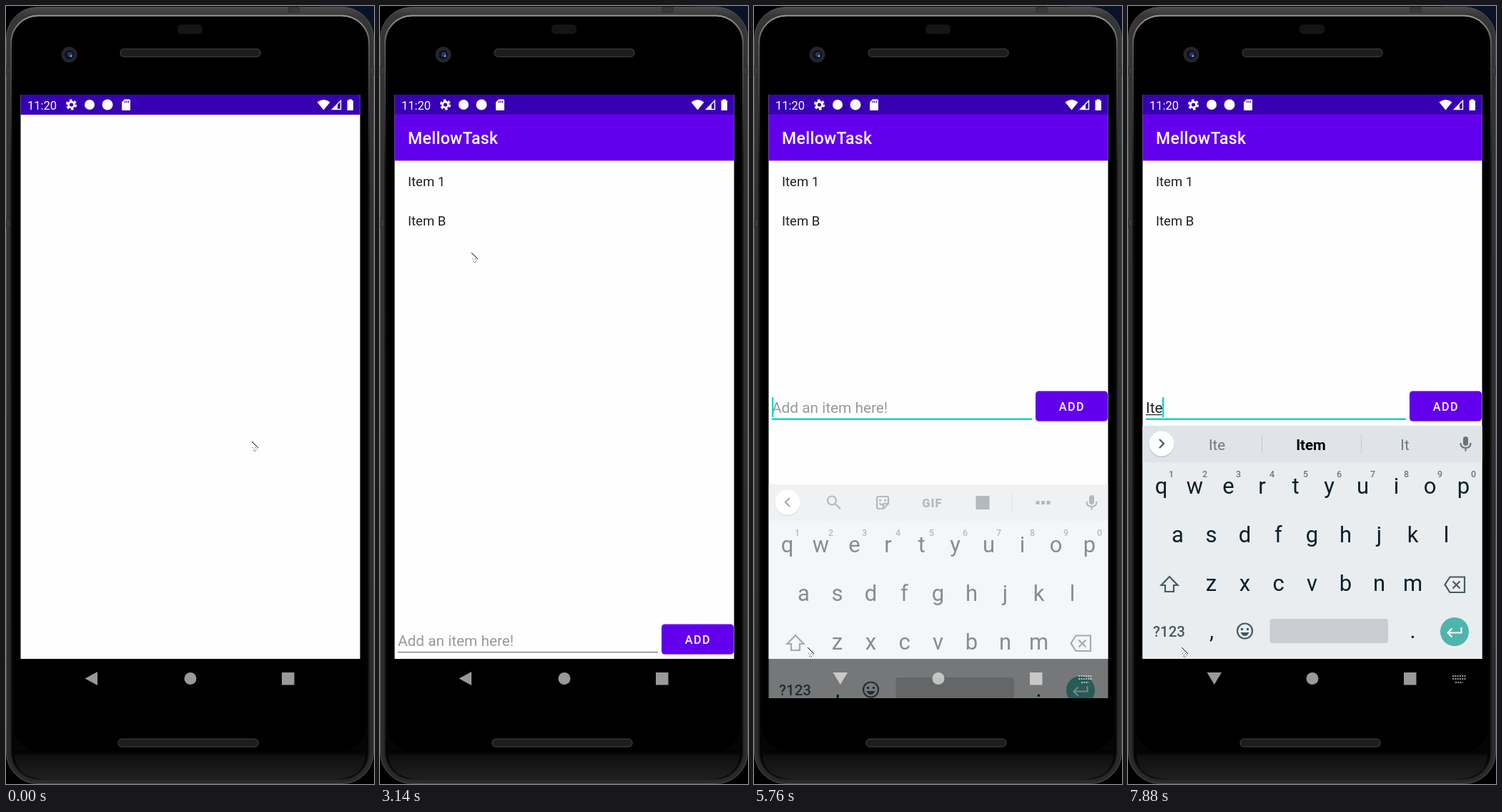
Animation, 515 px wide and 1088 px high, one loop 8 s. Source, as an HTML page:

```html
<!DOCTYPE html>
<html lang="en">
<head>
<meta charset="utf-8">
<title>To-do app on a phone</title>
<style>
  html, body { margin: 0; width: 100%; height: 100%; overflow: hidden; background: #000; }
  svg { display: block; width: 515px; height: 1088px; font-family: Roboto, sans-serif; }
  .mid { text-anchor: middle; }
  .line { fill: none; stroke-width: 2.2; }
  .tools { fill: #69757b; stroke: #69757b; }
  .tools text, .tools .solid { stroke: none; }
  .dark { stroke: #455a64; }
  .keys { font-size: 31px; fill: #0c1f28; }
</style>
</head>
<body>
<svg viewBox="0 0 515 1088">
  <defs>
    <linearGradient id="body" x2="0" y2="1">
      <stop offset="0" stop-color="#4c4c4c"/><stop offset=".012" stop-color="#363636"/>
      <stop offset=".08" stop-color="#333"/><stop offset="1" stop-color="#2a2a2a"/>
    </linearGradient>
    <linearGradient id="rim" x2="0" y2="1">
      <stop offset="0" stop-color="#999"/><stop offset=".04" stop-color="#555"/>
      <stop offset=".2" stop-color="#161616"/><stop offset="1" stop-color="#1c1c1c"/>
    </linearGradient>
    <linearGradient id="chin" x2="0" y2="1">
      <stop offset="0" stop-color="#000"/><stop offset=".2" stop-color="#101010"/>
      <stop offset="1" stop-color="#202020"/>
    </linearGradient>
    <clipPath id="screen"><path d="M20.500 124H495.500V968H20.500Z"/></clipPath>
  </defs>

  <path d="M440 0H515V50Z" fill="#0a1228"/>
  <rect x=".5" y="1.500" width="514" height="1086" rx="44" fill="url(#body)" stroke="#505050"/>
  <g fill="#3a3a3a" stroke="#2a2a2a">
    <path d="M0 85H6V96H0ZM0 298H6V309H0ZM509 85H515V96H509ZM395 2H410V8H395Z"/>
  </g>
  <rect x="7" y="13.500" width="501" height="1068" rx="38" fill="#050505" stroke="url(#rim)" stroke-width="2"/>
  <path d="M12 1042H503V1050Q500 1080 460 1081H55Q15 1080 12 1050Z" fill="url(#chin)"/>
  <rect x="11" y="16" width="493" height="1026" rx="34"/>
  <g fill="#1d1d1d" stroke="#484848">
    <rect x="160" y="60" width="196" height="11" rx="5"/>
    <rect x="157" y="1025" width="196" height="11" rx="5"/>
  </g>
  <rect x="240" y="26" width="35" height="13" rx="5" fill="#151515"/>
  <circle cx="88.500" cy="68" r="11" fill="#25262a"/>
  <circle cx="88.500" cy="68" r="6.500" fill="#0d1128"/>
  <circle cx="89.500" cy="68" r="3.500" fill="#293862"/>
  <circle cx="91" cy="70" r="1.200" fill="#a9b8dc"/>

  <path d="M20.500 124H495.500V913H20.500Z" fill="#fefefe"/>
  <path d="M20.500 124H495.500V152H20.500Z" fill="#3700b3"/>
  <g fill="#fff">
    <text x="30" y="144.500" font-size="16.500">11:20</text>
    <g fill="none" stroke="#fff" stroke-width="2.800">
      <circle cx="91.500" cy="138" r="4"/>
      <circle cx="91.500" cy="138" r="6.200" stroke-dasharray="3.500 2.993"/>
    </g>
    <circle cx="117" cy="138" r="7"/>
    <circle cx="142" cy="138" r="7.500"/>
    <path d="M166 130.500H172.500Q174 130.500 174 132V144.500Q174 146 172.500 146H163.500Q162 146 162 144.500V134.500Z"/>
    <path d="M166.500 132.500V135.500M169 132.500V135.500M171.500 132.500V135.500" stroke="#3700b3" stroke-width="1.200"/>
    <path d="M435.500 134.500Q444.500 127.500 453.500 134.500L444.500 145.500Z"/>
    <path d="M456.500 144.500L468.500 132.500V144.500Z" fill="none" stroke="#fff" stroke-width="1.400"/>
    <path d="M456 145L464 137V145Z"/>
    <path d="M479.500 130.500H484V132H486V146H477.500V132H479.500Z"/>
  </g>

  <g id="app">
    <path d="M20.500 216H495.500V217H20.500Z" fill="#000" opacity=".06"/>
    <path d="M20.500 151.500H495.500V216.300H20.500Z" fill="#6200ee"/>
    <text x="39" y="193" fill="#fff" font-size="23" font-weight="500" letter-spacing=".35">MellowTask</text>
    <g font-size="18.500" fill="#202020">
      <text x="39" y="251.500">Item 1</text>
      <text x="39" y="306.500">Item B</text>
    </g>
    <g id="entry">
      <text id="hint" x="25" y="894.500" font-size="20.800" fill="#999">Add an item here!</text>
      <text id="typed" x="25" y="894.500" font-size="20.800" fill="#202020"></text>
      <path id="composing" fill="#202020"/>
      <path id="idleLine" d="M25 903H389V904.200H25Z" fill="#777"/>
      <path id="focusLine" d="M25 902.500H389V905H25Z" fill="#00dac5"/>
      <path id="caret" d="M0 873H2.300V901H0Z" fill="#00dac5"/>
      <rect x="394" y="865.500" width="101" height="42" rx="5" opacity=".15"/>
      <rect x="394" y="864.500" width="101" height="42" rx="4.500" fill="#6200ee"/>
      <text x="445" y="891.500" class="mid" fill="#fff" font-size="16.200" font-weight="500" letter-spacing="1.450">ADD</text>
    </g>
  </g>

  <g clip-path="url(#screen)">
    <g id="keyboard">
      <path d="M20 587H496V913H20Z" fill="#e9edf0"/>
      <path d="M20 587H496V638H20Z" fill="#e0e4e8"/>
      <circle cx="47" cy="613.500" r="17.800" opacity=".12"/>
      <circle cx="47" cy="612" r="17.500" fill="#fff"/>
      <path id="chevron" class="line dark"/>
      <g id="toolbar" class="tools">
        <circle class="line" cx="109" cy="609.500" r="6"/>
        <path class="line" d="M113.500 614L121 621.500"/>
        <path class="line" d="M174 604H186Q188 604 188 606V614L181 621H174Q172 621 172 619V606Q172 604 174 604ZM188 614H183Q181 614 181 616V621M175.500 613Q178 617 181 614"/>
        <path class="solid" d="M175 608H178V610.500H175ZM182 608H185V610.500H182Z"/>
        <text x="249.500" y="618.500" class="mid" font-size="16.500" font-weight="900" letter-spacing="1">GIF</text>
        <path class="solid" d="M310.500 603H329.500V622H310.500Z"/>
        <path d="M361.500 599V626" stroke="#c5cace"/>
        <path class="solid" d="M394.500 610H399.500V615H394.500ZM402 610H407V615H402ZM409.500 610H414.500V615H409.500Z"/>
      </g>
      <g id="suggestions" class="mid" font-size="20.500" fill="#6c777c">
        <text x="124.500" y="620.500">Ite</text>
        <text x="256" y="620.500" font-weight="700" fill="#000">Item</text>
        <text x="387.500" y="620.500">It</text>
        <path d="M187.500 599V626M326.500 599V626" stroke="#c5cace"/>
      </g>
      <g class="tools">
        <rect class="solid" x="469" y="602" width="7" height="13" rx="3.500"/>
        <path class="line" d="M465.500 611Q465.500 618 472.500 618T479.500 611M472.500 618V622.500"/>
      </g>
      <g id="digits" class="mid" font-size="12.500" font-weight="500" fill="#6c777c"></g>
      <g id="lower" class="mid keys"></g>
      <g id="upper" class="mid keys"></g>
      <path id="shift" class="line dark" d="M58 798L69.500 810H64V819H52V810H46.500Z"/>
      <path class="line dark" d="M450.500 798.500H471V820H450.500L443.500 809.200ZM454.500 804.500L464.500 814.500M464.500 804.500L454.500 814.500"/>
      <text x="57.500" y="882" class="mid" font-size="20.500" font-weight="500" fill="#455a64">?123</text>
      <g class="mid keys"><text x="117" y="884">,</text><text x="398.500" y="884">.</text></g>
      <circle class="line dark" cx="163.500" cy="874" r="10.500"/>
      <path d="M158 870H161V873H158ZM166 870H169V873H166ZM157.500 876H169.500Q167.500 881 163.500 881T157.500 876Z" fill="#455a64"/>
      <rect x="198.500" y="857" width="165.500" height="34" rx="4" fill="#c9ccd0"/>
      <circle cx="457" cy="875" r="20" fill="#4db6ac"/>
      <path class="line" stroke="#fff" d="M466.500 869V876.500H448M453.500 870.500L447.500 876.500L453.500 882.500"/>
    </g>
  </g>

  <g fill="#fff" fill-opacity=".6">
    <path id="back"/>
    <circle cx="258" cy="940.500" r="8.500"/>
    <path d="M386 932H403.500V949.500H386Z"/>
    <path id="imeIcon" d="M454 937H472.500M454 941H472.500M458 946H468.500" stroke="#fff" stroke-opacity=".6" stroke-width="2" stroke-dasharray="2.100 1.200"/>
  </g>

  <g id="pointer" shape-rendering="crispEdges">
    <path d="M0 0L9 9" stroke="#000"/>
    <path d="M1 8.500H2M3 10.500H4M5 8.500H6M7 10.500H8M2 12.500H3M5 12.500H6M4 13.500H5" stroke="#555"/>
  </g>
</svg>

<script>
const LOOP = 8000;
const el = id => document.getElementById(id);
const set = (id, name, value) => el(id).setAttribute(name, value);
const show = (id, on) => set(id, 'visibility', on ? 'inherit' : 'hidden');

// The pointer is sampled: it holds each place until the next time.
const pointerStops = [
  [0, 344, 609], [1740, 174, 311], [1890, 136, 315], [2040, 86, 543],
  [2180, 205, 849], [2330, 168, 874], [2450, 148, 890], [2600, 142, 896],
  [2750, 132, 760], [2870, 177, 457], [3020, 150, 400], [3140, 128, 345],
  [3260, 114, 315], [3380, 107, 302], [3500, 103, 296], [3760, 100, 296],
  [4290, 95, 296], [4430, 97, 420], [4550, 92, 640], [4670, 81, 820],
  [4800, 84, 868], [4950, 75, 897]
];
// time, opacity, distance below its resting place
const keyboardStops = [[0, 0, 0], [5640, .2, 140], [5760, .5, 82], [5880, 1, 0]];
const typedStops = [[0, '', 25], [6580, 'I', 30.6], [7760, 'It', 37.4], [7880, 'Ite', 48]];
const caretStops = [[0, false], [5350, true], [5880, false], [6290, true], [7090, false], [7510, true]];
const at = (stops, t) => stops.findLast(stop => stop[0] <= t);

const label = (char, x, y) => `<text x="${x}" y="${y}">${char}</text>`;
const spread = (chars, x, y) => [...chars].map((char, i) => label(char, x + 47 * i, y)).join('');
const rows = [['qwertyuiop', 46.5], ['asdfghjkl', 69.5], ['zxcvbnm', 116.5]];
const keyRows = (baseline, change) =>
  rows.map(([chars, x], i) => spread(change(chars), x, baseline + 68 * i)).join('');

el('digits').innerHTML = spread('1234567890', 60.5, 659);
el('lower').innerHTML = keyRows(682, s => s);
el('upper').innerHTML = keyRows(684, s => s.toUpperCase());

function draw(t) {
  const [, x, y] = at(pointerStops, t);
  set('pointer', 'transform', `translate(${x} ${y})`);
  set('app', 'opacity', t < 1090 ? 0 : t < 1210 ? .6 : 1);

  const open = t >= 5640, focused = t >= 5350;
  set('entry', 'transform', `translate(0 ${open ? -326 : 0})`);
  show('idleLine', !focused);
  show('focusLine', focused);

  const [, text, end] = at(typedStops, t);
  el('typed').textContent = text;
  show('hint', !text);
  set('composing', 'd', text ? `M25 897H${end - .5}V898.2H25Z` : '');
  set('caret', 'transform', `translate(${end} 0)`);
  show('caret', at(caretStops, t)[1]);

  const [, opacity, drop] = at(keyboardStops, t);
  show('keyboard', open);
  set('keyboard', 'opacity', opacity);
  set('keyboard', 'transform', `translate(0 ${drop})`);
  const capitals = t >= 6430 && t < 6580, suggesting = t >= 7880;
  show('upper', open && capitals);
  show('lower', open && !capitals);
  el('shift').style.fill = capitals ? '#455a64' : 'none';
  show('toolbar', open && !suggesting);
  show('suggestions', open && suggesting);
  set('chevron', 'd', suggesting ? 'M44 606L50 612L44 618' : 'M50 606L44 612L50 618');

  set('back', 'd', open ? 'M110.5 932H131L120.800 949Z' : 'M110.5 940.500L128 931V950Z');
  show('imeIcon', open);
}

function tick() {
  draw(performance.now() % LOOP);
  requestAnimationFrame(tick);
}
tick();
</script>
</body>
</html>
```
